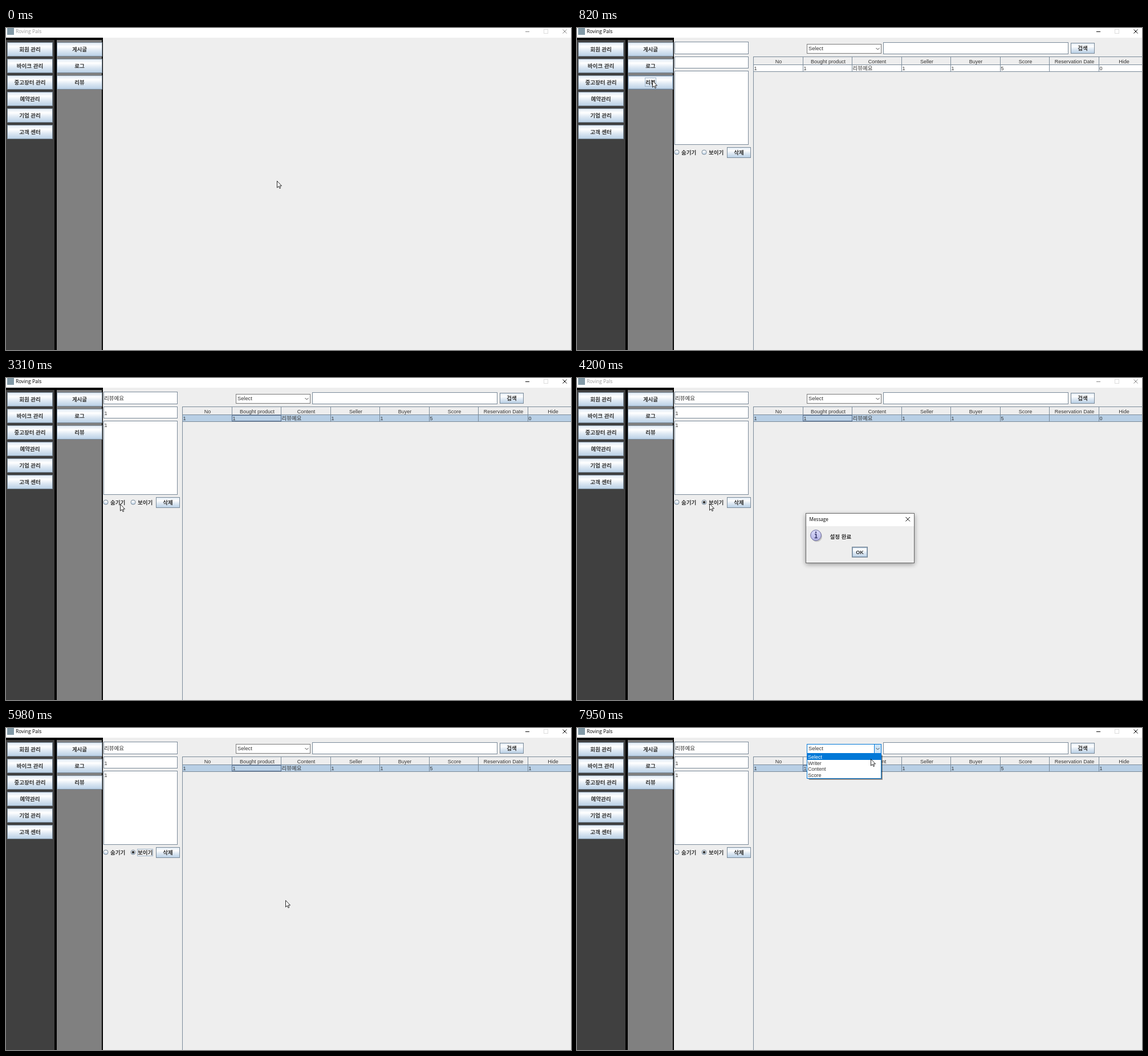
Recreate the animation shown at these times as an HTML page. Size 991x565 px, loop 8 s.

```html
<!DOCTYPE html>
<html lang="ko">
<head>
<meta charset="utf-8">
<title>Roving Pals</title>
<style>
html, body { margin: 0; width: 100%; height: 100%; overflow: hidden; background: #eee; }
svg { display: block; width: 991px; height: 565px; }
rect, .line { shape-rendering: crispEdges; }
text { font: 9px "Liberation Sans", "Noto Sans CJK KR", "Noto Sans CJK", sans-serif; fill: #333; white-space: pre; }
.ko { font: 9.5px "Noto Sans CJK KR", "Noto Sans CJK", sans-serif; }
.bold { font: bold 9.5px "Noto Sans CJK KR", "Noto Sans CJK", sans-serif; }
.ui { font: 8.6px "Open Sans", "Noto Sans", sans-serif; fill: #000; }
</style>
</head>
<body>
<svg id="stage" viewBox="0 0 991 565" xmlns="http://www.w3.org/2000/svg"></svg>
<script>
const LOOP = 8000;
const EDGE = '#7a8a99';
const BLUE = '#0078d7';
const PALE = '#b8cfe5';

// ---- drawing helpers ----
const rect = (x, y, w, h, fill, extra = '') =>
  `<rect x="${x}" y="${y}" width="${w}" height="${h}" fill="${fill}" ${extra}/>`;
const box = (x, y, w, h, fill, stroke = EDGE, extra = '') =>
  rect(x + .5, y + .5, w - 1, h - 1, fill, `stroke="${stroke}" ${extra}`);
const path = (d, stroke, extra = '') => `<path d="${d}" fill="none" stroke="${stroke}" ${extra}/>`;
const text = (x, y, s, cls = '', extra = '') => `<text x="${x}" y="${y}" class="${cls}" ${extra}>${s}</text>`;
const mid = (x, y, s, cls = '', extra = '') => text(x, y, s, cls, `text-anchor="middle" ${extra}`);
const group = (id, body) => `<g id="${id}">${body}</g>`;
const button = (x, y, w, h, label) =>
  box(x, y, w, h, 'url(#ocean)') + mid(x + w / 2, y + h / 2 + 3.6, label, 'bold');
const radio = (x, label) =>
  `<circle cx="${x}" cy="218" r="4" fill="url(#ocean)" stroke="${EDGE}"/>` + text(x + 8, 221.7, label, 'bold');

const defs = `<defs>
  <linearGradient id="ocean" x2="0" y2="1">
    <stop stop-color="#dde8f3"/><stop offset=".3" stop-color="#fff"/>
    <stop offset=".6" stop-color="#dde8f3"/><stop offset="1" stop-color="${PALE}"/>
  </linearGradient>
  <linearGradient id="orb" x2="0" y2="1">
    <stop stop-color="#dcdcfa"/><stop offset="1" stop-color="#b4b4e6"/>
  </linearGradient>
  <filter id="blur" x="-20%" y="-30%" width="140%" height="160%"><feGaussianBlur stdDeviation="4"/></filter>
</defs>`;

function frameBar() {
  return rect(0, 0, 991, 17, '#fff') + rect(2, 0, 12, 12, '#8299a6') +
    text(17, 9.3, 'Roving Pals', 'ui', 'id="title"') +
    path('M943.5 2.5h7v7h-7z', '#ddd', 'class="line"') +
    group('winButtons', path('M911 6.5h7', 'currentColor', 'class="line"') +
      path('M976.5 2.5l7 7m0-7l-7 7', 'currentColor'));
}

function menus() {
  const left = ['회원 관리', '바이크 관리', '중고장터 관리', '예약관리', '기업 관리', '고객 센터'];
  const right = ['게시글', '로그', '리뷰'];
  const column = (names, x, w) => names.map((s, i) => button(x, 25 + 29 * i, w, 25, s)).join('');
  return rect(0, 17, 170, 548, '#000') + rect(0, 21, 85, 544, '#404040') + rect(89, 21, 79, 544, '#808080') +
    column(left, 2, 80) + column(right, 89, 80) +
    group('hover', box(90, 84, 78, 23, 'none', '#a3b8cc') + box(89, 83, 80, 25, 'none', '#6a7f95')) +
    group('menuFocus', box(119, 87, 20, 16, 'none', '#a3b8cc'));
}

function form() {
  return box(171, 24, 130, 22, '#fff') + box(171, 50, 130, 21, '#fff') + box(171, 75, 130, 130, '#fff') +
    radio(175, '숨기기') + radio(223, '보이기') + button(263, 209, 42, 19, '삭제') +
    group('filled', text(172, 38.7, '리뷰예요', 'ko') + text(172.5, 64.5, '1') + text(172.5, 85.5, '1')) +
    group('chosen', '<circle cx="223" cy="218" r="2.3" fill="#333"/>') +
    group('radioFocus', box(230, 212, 28, 13, 'none', '#a3b8cc'));
}

function table() {
  const heads = ['No', 'Bought product', 'Content', 'Seller', 'Buyer', 'Score', 'Reservation Date', 'Hide'];
  const row = ['1', '1', '리뷰예요', '1', '1', '5', '', '0'];
  const colX = i => Math.round(309 + 86.5 * i);
  const cells = heads.map((h, i) => mid(colX(i) + 44.5, 61.7, h) +
    path(`M${colX(i) + .5} 50V76.5`, EDGE, 'class="line"') +
    text(colX(i) + 1.5, 73.8, row[i], i === 2 ? 'ko' : '', i === 7 ? 'id="hide"' : '')).join('');
  return rect(309, 65, 682, 11, '#fff', 'id="row"') + cells +
    path('M309 50.5H991M309 64.5H991M309 76.5H991M309.5 50V565', EDGE, 'class="line"') +
    group('cell', box(396, 65, 87, 11, 'none', '#536b8c'));
}

function search() {
  return box(403, 28, 131, 17, '#fff', '#7a7a7a', 'id="combo"') +
    group('arrowBox', box(521, 28, 13, 17, '#cce4f7', BLUE)) +
    text(406, 39.3, 'Select', '', 'style="font-size:9.3px"') +
    path('M524.5 35l3 3 3-3', '#444') +
    box(537, 25, 325, 21, '#fff') + button(866, 26, 42, 19, '검색');
}

function popup() {
  const items = ['Select', 'Writer', 'Content', 'Score'];
  return rect(407, 48, 129, 43, '#000', 'opacity=".35"') + rect(405, 46, 130, 44, '#000', 'opacity=".25"') +
    box(403, 44, 131, 45, '#fff', BLUE) + rect(404, 45, 129, 11, BLUE) +
    items.map((s, i) => text(405, 53.6 + 10.9 * i, s, '', i ? '' : 'style="fill:#fff"')).join('');
}

function dialog() {
  return rect(401, 240, 191, 87, '#000', 'filter="url(#blur)" opacity=".38"') +
    box(401, 237, 191, 88, '#eee', '#666') + rect(402, 238, 189, 22, '#fff') +
    text(407.5, 251.3, 'Message', 'ui', 'style="font-size:8.2px"') +
    path('M576.5 244l7.5 7.5m0-7.5l-7.5 7.5', '#000') +
    '<circle cx="420.5" cy="278" r="9.5" fill="#aaa" opacity=".6"/>' +
    '<circle cx="419" cy="276" r="9.3" fill="url(#orb)" stroke="#666699"/>' +
    path('M417 274h2.5v6M416.7 280.5h5', '#333366', 'stroke-width="1.6"') +
    '<circle cx="419" cy="270.8" r="1.3" fill="#333366"/>' +
    text(443.5, 281.8, '설정 완료', 'bold') +
    box(482, 296, 28, 19, 'url(#ocean)', EDGE, 'id="ok"') + box(483, 297, 26, 17, 'none', '#8ca3ba') +
    mid(496, 309.2, 'OK', '', 'style="font-weight:bold"');
}

const stage = document.getElementById('stage');
stage.innerHTML = defs + rect(0, 0, 991, 565, '#eee') + frameBar() + menus() +
  group('panel', form() + table() + search()) + group('popup', popup()) + group('dialog', dialog()) +
  '<circle id="spot" r="9" cx="1" cy="2" fill="#eae41c" opacity=".75"/>' +
  group('cursor', '<path d="M.5 .5V12.2L3.2 9.7 5 13.6 6.7 12.8 5 9H8.5Z" fill="#fff" stroke="#111" stroke-width=".9"/>');

const el = {};
stage.querySelectorAll('[id]').forEach(n => el[n.id] = n);

// ---- motion: [first step, last step, step count, x, y] ----
const START = [475, 268];
const moves = [
  [70, 360, 5, 132, 82], [530, 590, 2, 132, 92],
  [900, 1520, 9, 372, 46], [1600, 2080, 7, 426, 66],
  [2790, 3090, 5, 157, 239], [3165, 3310, 3, 200, 221], [3385, 3540, 3, 220, 216], [3640, 3640, 1, 221, 216],
  [4170, 4720, 8, 467, 299], [4810, 5060, 4, 489, 301],
  [5380, 5380, 1, 490, 301], [5980, 5980, 1, 490, 302],
  [6200, 6280, 2, 429, 271], [6450, 7000, 8, 517, 39], [7080, 7160, 2, 517, 37],
  [7690, 7950, 4, 515, 54]
];
const clicks = [[740, 820], [2250, 2310], [3940, 4020], [5280, 5380], [7310, 7390]];
const smooth = f => f * f * (3 - 2 * f);

function pointer(t) {
  let [x, y] = START;
  for (const [a, b, n, tx, ty] of moves) {
    if (t < a) break;
    const step = t >= b ? n : Math.floor((t - a) / (b - a) * (n - 1)) + 1;
    const f = smooth(step / n);
    x += (tx - x) * f;
    y += (ty - y) * f;
  }
  return [Math.round(x), Math.round(y)];
}

const show = (name, on) => el[name].style.display = on ? '' : 'none';

function draw(t) {
  const within = (a, b) => t >= a && t < b;
  const [x, y] = pointer(t);
  const over = (l, top, r, b) => x >= l && x < r && y >= top && y < b;
  const modal = within(4100, 5440);
  const active = t >= 740 && !modal;
  const open = t >= 7390;

  el.title.style.fill = active ? '#000' : '#999';
  el.winButtons.style.color = active ? '#000' : '#888';
  show('hover', over(89, 82, 169, 108));
  show('menuFocus', within(740, 2250));
  show('panel', t >= 820);
  show('filled', t >= 2310);
  show('cell', t >= 2250);
  el.row.setAttribute('fill', t >= 2250 ? PALE : '#fff');
  show('chosen', t >= 4020);
  show('radioFocus', within(4020, 4100) || within(5440, 7390));
  el.hide.textContent = t >= 5440 ? '1' : '0';
  show('dialog', modal);
  el.ok.setAttribute('fill', within(5280, 5380) ? PALE : 'url(#ocean)');
  show('popup', open);
  show('arrowBox', open);
  el.combo.setAttribute('stroke', open ? BLUE : over(403, 28, 534, 45) ? '#333' : '#7a7a7a');

  const place = `translate(${x} ${y})`;
  el.cursor.setAttribute('transform', place);
  el.spot.setAttribute('transform', place);
  show('spot', clicks.some(([a, b]) => within(a, b)));
}

const begin = performance.now();
function tick() {
  draw((performance.now() - begin) % LOOP);
  requestAnimationFrame(tick);
}
tick();
</script>
</body>
</html>
```
